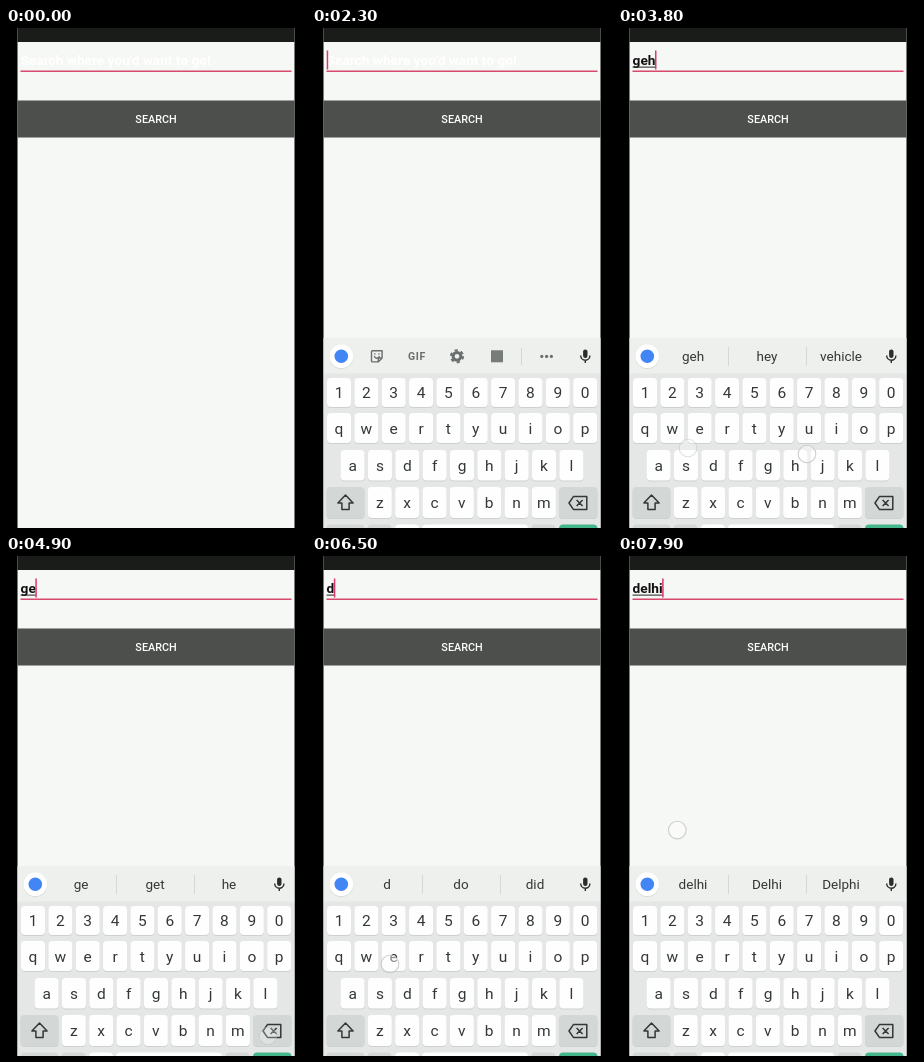
Animation of 300 by 500 pixels, one loop 8000 ms. Source, as an HTML page:

```html
<!DOCTYPE html>
<html lang="en">
<head>
<meta charset="utf-8">
<title>Search typing</title>
<style>
  html, body { margin: 0; width: 100%; height: 100%; overflow: hidden; background: #000; }
  svg { display: block; width: 100vw; height: 100vh; }
  text { font-family: Roboto, "Noto Sans", sans-serif; white-space: pre; }
  .mid { text-anchor: middle; }
  .field { font-size: 13.7px; font-weight: 700; }
  .line { fill: none; stroke: #6a6e6c; stroke-width: 1.4; stroke-linejoin: round; stroke-linecap: round; }
</style>
</head>
<body>
<svg viewBox="0 0 300 500" xmlns="http://www.w3.org/2000/svg">
  <rect width="300" height="500"/>
  <rect x="11.5" width="277" height="500" fill="#f6f8f5"/>
  <rect x="11.5" width="277" height="14" fill="#1a1c19"/>
  <rect x="11.5" y="72.5" width="277" height="37" fill="#4d4f4c"/>
  <text class="mid" x="150" y="95.3" font-size="10.8" font-weight="500" fill="#fff">SEARCH</text>
  <rect x="14.5" y="42.5" width="271" height="1.5" fill="#d8486f"/>
  <text id="hint" class="field" x="14.6" y="37.2" fill="#fff">Search where you'd want to go!</text>
  <text id="typed" class="field" x="14.6" y="37.2" fill="#111"></text>
  <rect id="composing" x="14.6" y="38.6" height="1" fill="#222"/>
  <rect id="cursor" y="22.5" width="1.5" height="19" fill="#d8386b"/>

  <g id="keyboard">
    <rect x="11.5" y="310" width="277" height="36" fill="#eef0ee"/>
    <rect x="11.5" y="345.5" width="277" height="155" fill="#e4e7e5"/>
    <circle cx="29.3" cy="329" r="12" fill="#d9dcda"/>
    <circle cx="29.3" cy="328.3" r="11.8" fill="#fff"/>
    <circle cx="29.3" cy="328.3" r="6.8" fill="#4285f4"/>
    <g id="tools">
      <path class="line" d="M60.5 322.7h9.6v7.4l-3.8 3.8h-5.8q-1 0-1-1v-9.2q0-1 1-1zM70.1 330h-3.8v3.8M62.4 328.6q2.4 3.4 4.8 0M62.8 326h.2M66.8 326h.2"/>
      <text class="mid" x="105" y="332" font-size="10.5" font-weight="700" fill="#6a6e6c" letter-spacing=".7">GIF</text>
      <circle cx="145" cy="328.3" r="3.9" fill="none" stroke="#6a6e6c" stroke-width="3"/>
      <circle cx="145" cy="328.3" r="6.1" fill="none" stroke="#6a6e6c" stroke-width="2" stroke-dasharray="3.2 3.19"/>
      <rect x="179" y="322.3" width="12" height="12" fill="#777b79"/>
      <rect x="209" y="320" width="1" height="17" fill="#d2d5d3"/>
      <g fill="#6a6e6c">
        <circle cx="229.8" cy="328.4" r="1.6"/><circle cx="234.6" cy="328.4" r="1.6"/><circle cx="239.4" cy="328.4" r="1.6"/>
      </g>
    </g>
    <g id="suggestions" font-size="13.5" fill="#333836">
      <rect x="110" y="319" width="1" height="19" fill="#d5d8d6"/>
      <rect x="188" y="319" width="1" height="19" fill="#d5d8d6"/>
      <text class="mid" x="75" y="333"></text>
      <text class="mid" x="149" y="333"></text>
      <text class="mid" x="223" y="333"></text>
    </g>
    <rect x="271.1" y="321.4" width="4.4" height="8.6" rx="2.2" fill="#2b2d2c"/>
    <path d="M268.7 327.6a4.6 4.6 0 0 0 9.2 0M273.3 332.4v2.6" fill="none" stroke="#2b2d2c" stroke-width="1.4"/>
    <g id="keys"></g>
    <path d="M33.5 467l7.6 8h-4v6.6h-7.2V475h-4z" fill="none" stroke="#333836" stroke-width="1.5" stroke-linejoin="round"/>
    <path d="M257 475l4.4-6.4h13.4v12.8h-13.4zM264.6 472l6 6M270.6 472l-6 6" fill="none" stroke="#333836" stroke-width="1.5" stroke-linejoin="round"/>
  </g>
  <g id="touches"></g>
</svg>
<script>
const LOOP = 8000;
const BLINK = 500;
const STEP = 27.35;
const NS = "http://www.w3.org/2000/svg";
const $ = id => document.getElementById(id);

function add(parent, tag, attrs, text = "") {
  const node = document.createElementNS(NS, tag);
  for (const name in attrs) node.setAttribute(name, attrs[name]);
  node.textContent = text;
  return parent.appendChild(node);
}

function key(x, y, width, height, fill = "#fdfefd") {
  add($("keys"), "rect", { x, y: y + 1, width, height, rx: 4, fill: "#cdd1cf" });
  add($("keys"), "rect", { x, y, width, height, rx: 4, fill });
}

function keyRow(letters, firstX, y, height) {
  [...letters].forEach((letter, i) => {
    const x = firstX + i * STEP;
    key(x - 12, y, 24, height);
    add($("keys"), "text", { class: "mid", x, y: y + height / 2 + 5.8, "font-size": 15.5, fill: "#333836" }, letter);
  });
}

keyRow("1234567890", 27, 350, 29);
keyRow("qwertyuiop", 27, 385, 30);
keyRow("asdfghjkl", 40.6, 422, 30.5);
keyRow("zxcvbnm", 67.8, 459, 31);
const GREY = "#d3d8d7";
key(14.5, 459, 38, 31, GREY);
key(247, 459, 38.5, 31, GREY);
key(14.5, 496.5, 38, 30, GREY);
key(55.5, 496.5, 24, 30, GREY);
key(83, 496.5, 24, 30);
key(110, 496.5, 106, 30);
key(219.5, 496.5, 24, 30, GREY);
key(247, 496.5, 38.5, 30, "#45b58b");

// Field contents: start time, text, suggestions
const states = [
  [300, ""],
  [3500, "g", "g", "good", "go"],
  [3600, "ge", "ge", "get", "he"],
  [3800, "geh", "geh", "hey", "vehicle"],
  [4100, "gehn", "gehn", "gehen", "when"],
  [4600, "geh", "geh", "hey", "vehicle"],
  [4900, "ge", "ge", "get", "he"],
  [5100, "g", "g", "good", "go"],
  [5400, ""],
  [6400, "d", "d", "do", "did"],
  [6600, "de", "de", "see", "dear"],
  [6700, "del", "del", "Delhi", "delivery"],
  [7300, "delh", "delh", "Delhi", "delhi"],
  [7500, "delhi", "delhi", "Delhi", "Delphi"]
];

// Touches: start, release, from x, y, to x, y
const touches = [
  [1200, 1400, 64, 36],
  [2400, 3150, 209, 267, 44, 221],
  [3450, 3560, 150, 440],
  [3560, 3780, 70, 420],
  [3680, 3820, 189, 426],
  [3960, 4120, 206, 468],
  [4450, 4600, 262, 480],
  [4750, 4880, 262, 480],
  [5000, 5120, 262, 480],
  [5280, 5420, 261, 479],
  [6300, 6420, 98, 446],
  [6480, 6600, 78, 408],
  [6590, 6720, 266, 454],
  [7150, 7300, 180, 443],
  [7380, 7520, 212, 410],
  [7700, 8000, 66, 262, 56, 280]
].map(([start, end, x0, y0, x1 = x0, y1 = y0]) => ({
  start, end, x0, y0, x1, y1,
  node: add($("touches"), "circle", { r: 8.8, fill: "#fff", "fill-opacity": .5, stroke: "#c4c7c5", "stroke-width": 1.1 })
}));

const clamp = v => Math.max(0, Math.min(1, v));
const show = (node, visible) => node.setAttribute("visibility", visible ? "inherit" : "hidden");
const words = [...$("suggestions").querySelectorAll("text")];

function drawField(t) {
  const [since, text, ...hints] = states.filter(s => s[0] <= t).pop() || states[0];
  $("typed").textContent = text;
  const width = text ? $("typed").getComputedTextLength() : 0;
  show($("hint"), !text);
  $("composing").setAttribute("width", width);
  $("cursor").setAttribute("x", 14.7 + width - (text ? .6 : 0));
  show($("cursor"), Math.floor((t - since) / BLINK) % 2 === 0);
  show($("tools"), !text && t >= 1500);
  show($("suggestions"), text);
  words.forEach((word, i) => { word.textContent = hints[i] || ""; });
}

function drawKeyboard(t) {
  const p = clamp((t - 1200) / 300);
  $("keyboard").setAttribute("transform", `translate(0 ${130.5 * (1 - p) ** 2})`);
  $("keyboard").setAttribute("opacity", clamp(p * 1.7));
}

function drawTouches(t) {
  for (const { start, end, x0, y0, x1, y1, node } of touches) {
    const p = clamp((t - start) / (end - start));
    node.setAttribute("cx", x0 + (x1 - x0) * p);
    node.setAttribute("cy", y0 + (y1 - y0) * p);
    node.setAttribute("opacity", t < start ? 0 : .85 * clamp(1 - (t - end) / 50));
  }
}

function render(t) {
  drawField(t);
  drawKeyboard(t);
  drawTouches(t);
}

const origin = performance.now();
function tick() {
  render((performance.now() - origin) % LOOP);
  requestAnimationFrame(tick);
}
tick();
</script>
</body>
</html>
```
